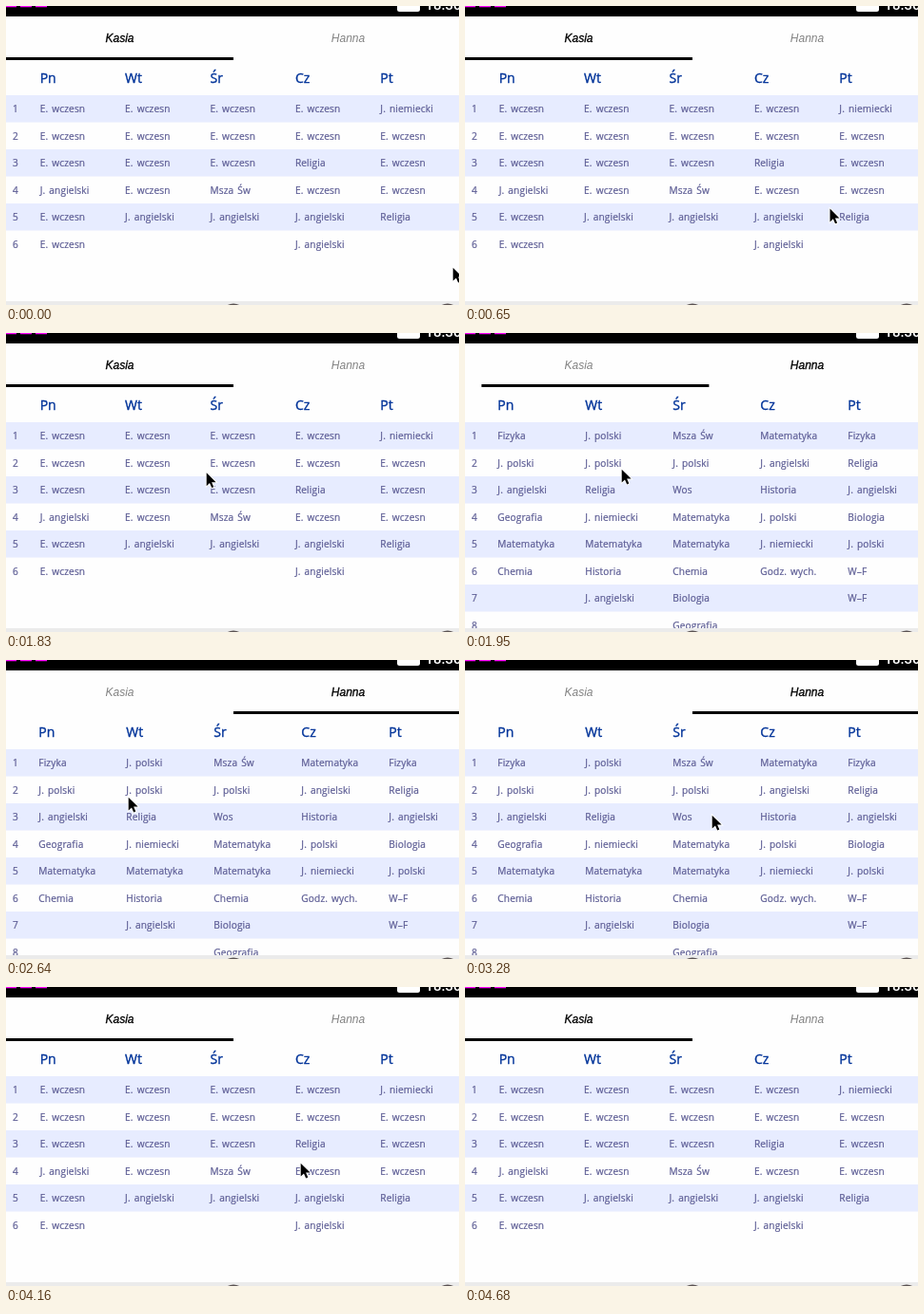
These frames come from a looping animation (476 by 315 pixels, 5.28 s). An HTML page:

```html
<!DOCTYPE html>
<html lang="pl">
<head>
<meta charset="utf-8">
<title>Plan lekcji</title>
<style>
html, body { margin: 0; width: 100%; height: 100%; overflow: hidden; background: #fefefe; }
svg { display: block; width: 476px; height: 315px; }
.cells { font: 10.1px "Open Sans", "Noto Sans", sans-serif; letter-spacing: .15px; word-spacing: 1.2px; }
.cells text { fill: #5c5c94; stroke: #5c5c94; stroke-width: .22px; }
.cells .head { font-size: 14px; letter-spacing: 0; fill: #039; stroke: #039; stroke-width: .35px; }
.tab { font: italic 12px "Liberation Sans", Arial, sans-serif; text-anchor: middle; fill: #828282; }
.tab.on { fill: #000; stroke: #000; stroke-width: .3px; }
.clock { font: 500 15px Roboto, sans-serif; fill: #fff; }
</style>
</head>
<body>
<svg viewBox="0 0 476 315">
  <rect width="476" height="315" fill="#fefefe"/>
  <g id="tables" class="cells"></g>
  <text id="tabA" class="tab" x="119.5" y="38">Kasia</text>
  <text id="tabB" class="tab" x="359.5" y="38">Hanna</text>
  <rect id="bar" y="54" width="239" height="3"/>
  <rect width="476" height="11"/>
  <path d="M0 0H11V1.2H0ZM15 0H27V1.2H15ZM31 0H43V1.2H31Z" fill="#f0f"/>
  <rect x="411" y="-6" width="24" height="12" rx="2.5" fill="#fff"/>
  <text class="clock" x="440.5" y="3.7">18:30</text>
  <rect y="311" width="476" height="4" fill="#ebebeb"/>
  <g fill="#5a5252">
    <circle cx="239" cy="326.5" r="13"/>
    <circle cx="464" cy="326.5" r="13"/>
  </g>
  <path id="cursor" d="M.7 .7V14.5l3.3-3.1 2.2 5 2.1-.9-2.2-5h4.5z" stroke="#fff" stroke-width="1.8" paint-order="stroke"/>
</svg>
<script>
const LOOP = 5280, ROW = 28.5;
const $ = id => document.getElementById(id);

const NAMES = {
  w: 'E. wczesn', n: 'J. niemiecki', a: 'J. angielski', p: 'J. polski', r: 'Religia',
  s: 'Msza Św', m: 'Matematyka', f: 'Fizyka', h: 'Historia', o: 'Wos', g: 'Geografia',
  b: 'Biologia', c: 'Chemia', z: 'Godz. wych.', x: 'W–F'
};
// One string per row, one letter per day
const PLAN_A = ['wwwwn', 'wwwww', 'wwwrw', 'awsww', 'waaar', 'w--a-'];
const PLAN_B = ['fpsmf', 'pppar', 'aroha', 'gnmpb', 'mmmnp', 'chczx', '-ab-x', '--g--'];

function add(parent, tag, attrs, text) {
  const el = document.createElementNS('http://www.w3.org/2000/svg', tag);
  for (const key in attrs) el.setAttribute(key, attrs[key]);
  if (text) el.textContent = text;
  return parent.appendChild(el);
}

function makeTable(plan, left, pitch) {
  const g = add($('tables'), 'g', {});
  const colX = i => left + i * pitch;
  plan.forEach((row, r) => {
    if (r % 2 === 0) add(g, 'rect', { y: 94 + r * ROW, width: 476, height: ROW, fill: '#e7ecff' });
    const y = 112 + r * ROW;
    add(g, 'text', { x: 7, y }, r + 1);
    [...row].forEach((c, i) => NAMES[c] && add(g, 'text', { x: colX(i), y }, NAMES[c]));
  });
  ['Pn', 'Wt', 'Śr', 'Cz', 'Pt'].forEach((day, i) =>
    add(g, 'text', { x: colX(i), y: 81, class: 'head' }, day));
  return g;
}

const tableA = makeTable(PLAN_A, 35.7, 89.4);
const tableB = makeTable(PLAN_B, 34.3, 92);

// Share of the held steps taken so far; the first lands at "from", the last at "to"
function steps(t, from, to, n) {
  if (t < from) return 0;
  if (t >= to) return 1;
  const gap = (to - from) / (n - 1) / 10;
  let i = 0;
  while (i < n - 1 && t >= from + Math.round((i + 1) * gap) * 10) i++;
  return (i + 1) / n;
}

// from, to, steps, end x, end y, ease-out power
const START = [469, 275];
const MOVES = [
  [480, 1000, 10, 308, 159, 1.5],
  [1060, 1110, 2, 302, 154, 1],
  [1650, 1950, 6, 164, 143, 1],
  [2000, 2120, 3, 149, 144, 1.6],
  [2470, 2640, 4, 128, 144, 1.3],
  [2700, 2930, 5, 125, 154, 1],
  [3110, 3280, 4, 259, 163, 1],
  [3330, 3500, 4, 287, 166, 2],
  [4160, 4160, 1, 309, 185, 1],
  [4220, 4680, 9, 463, 324, 1]
];

function cursorAt(t) {
  let [x, y] = START;
  for (const [from, to, n, endX, endY, power] of MOVES) {
    if (t < from) break;
    const k = 1 - (1 - steps(t, from, to, n)) ** power;
    x += (endX - x) * k;
    y += (endY - y) * k;
  }
  return [x, y];
}

function slide(t, from, to) {
  const k = steps(t, from, to, 4);
  if (!k) return 0;
  const u = 0.165 + 0.835 * (k * 4 - 1) / 3;
  return u * u * (3 - 2 * u);
}

function draw(t) {
  const second = t >= 1950 && t < 3330;
  tableA.style.display = second ? 'none' : '';
  tableB.style.display = second ? '' : 'none';
  $('tabA').classList.toggle('on', !second);
  $('tabB').classList.toggle('on', second);
  $('bar').setAttribute('x', 239 * (slide(t, 1950, 2120) - slide(t, 3330, 3500)));
  $('cursor').setAttribute('transform', `translate(${cursorAt(t)})`);
}

const begin = performance.now();
function tick() {
  draw((performance.now() - begin) % LOOP);
  requestAnimationFrame(tick);
}
tick();
</script>
</body>
</html>
```
